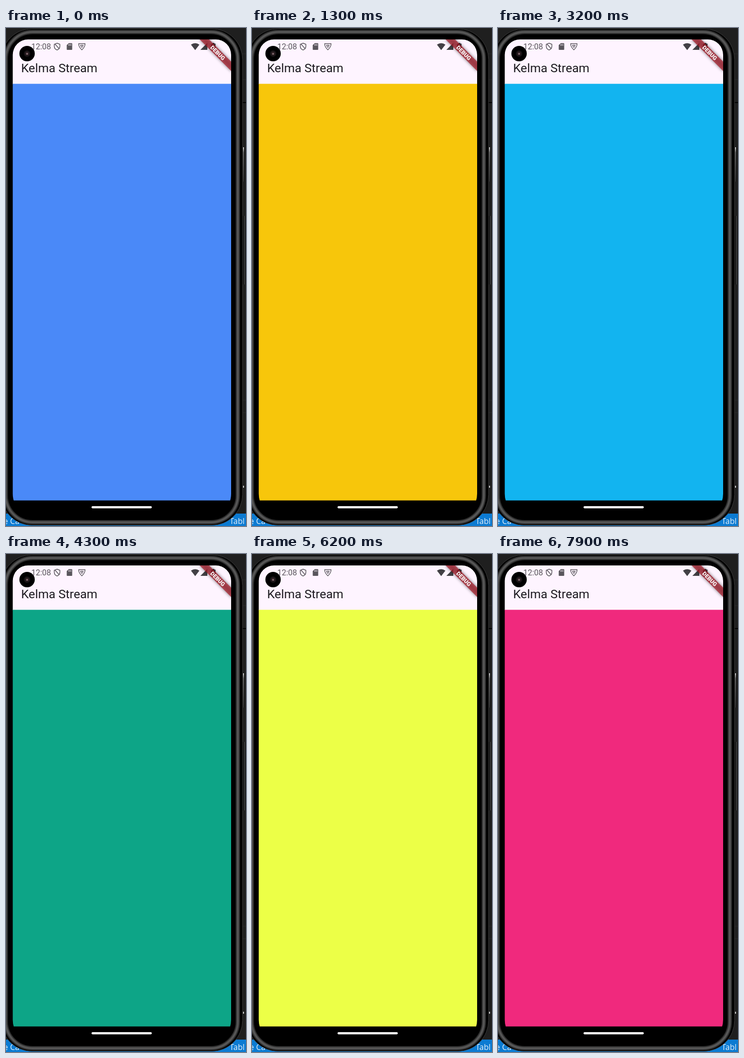
Animation of 484 by 1002 pixels, one loop 8000 ms. Source, as an HTML page:

```html
<!DOCTYPE html>
<html lang="en">
<head>
<meta charset="utf-8">
<title>Colour stream</title>
<style>
html, body { margin: 0; width: 100%; height: 100%; overflow: hidden; background: #1f1f1f; }
svg { display: block; }
text { font-family: Roboto, sans-serif; }
.desk { font: 16px "Open Sans", "Noto Sans", sans-serif; fill: #e4f0fa; }
</style>
</head>
<body>
<svg width="484" height="1002" viewBox="0 0 484 1002">
  <defs>
    <clipPath id="glass">
      <path d="M13.600 54A31 31 0 0 1 44.600 23H423A31 31 0 0 1 454 54V937A50 50 0 0 1 404 987H63.600A50 50 0 0 1 13.600 937Z"/>
    </clipPath>
    <linearGradient id="key" x2="0" y2="1">
      <stop offset="0" stop-color="#ddd"/>
      <stop offset=".15" stop-color="#666"/>
      <stop offset="1" stop-color="#333"/>
    </linearGradient>
    <filter id="blur" x="-20%" y="-80%" width="140%" height="260%"><feGaussianBlur stdDeviation="3.4"/></filter>
    <rect id="rim" x="-.5" y="8" width="468" height="986.500" rx="54" fill="none"/>
  </defs>

  <!-- desktop behind the phone -->
  <rect width="484" height="1002" fill="#1f1f1f"/>
  <path d="M474 52h10M474 104h10M474 749h10M474 774h10" stroke="#2b2b2b"/>
  <path d="M474 150h10" stroke="#000" stroke-width="2"/>
  <rect x="478" y="921" width="2" height="4" fill="#ccc"/>
  <rect y="977" width="484" height="25" fill="#0c7bd2"/>
  <text class="desk" x="-5" y="998">e Ca</text>
  <text class="desk" x="451" y="998">Tabl</text>

  <!-- phone body -->
  <rect x="477" y="240" width="4" height="69" fill="#111"/>
  <rect x="478" y="240" width="2" height="69" fill="url(#key)"/>
  <rect x="477" y="378" width="4" height="138" fill="#111"/>
  <path d="M480.500 378V516" stroke="#555"/>
  <rect x="-9.500" y="1.500" width="486.500" height="999" rx="62" fill="#000" stroke="#3a3a3a"/>
  <use href="#rim" stroke="#262626" stroke-width="9"/>
  <use href="#rim" stroke="#404040" stroke-width="6"/>
  <use href="#rim" stroke="#585858" stroke-width="3"/>

  <!-- screen -->
  <g clip-path="url(#glass)">
    <rect x="13" y="23" width="441" height="90" fill="#fef4ff"/>
    <rect id="body" x="13" y="112.300" width="441" height="838.300" fill="#4a89f8"/>
    <text x="30.500" y="88.500" font-size="24.600" fill="#1d1b20">Kelma Stream</text>
    <g fill="#59565c">
      <text x="51" y="43" font-size="16">12:08</text>
      <path d="M103 30.500l5.600 2.200v4.200q0 5-5.600 7.300q-5.600-2.300-5.600-7.300v-4.200zM98.500 32l9 10" fill="none" stroke="#59565c" stroke-width="1.500"/>
      <path d="M126.500 30.500H132.500Q133.500 30.500 133.500 31.500V43Q133.500 44 132.500 44H123.500Q122.500 44 122.500 43V34.500Z"/>
      <path d="M126.500 32.500v3M128.700 32.500v3M131 32.500v3" stroke="#fef4ff"/>
      <path d="M146.500 31.500H159.500Q159.500 38 153 44Q146.500 38 146.500 31.500Z" fill="none" stroke="#59565c" stroke-width="1.400" stroke-linejoin="round"/>
      <path d="M149.800 34h6.400q0 3-3.200 6q-3.200-3-3.200-6z"/>
      <circle cx="153" cy="36.300" r="1.200" fill="#fef4ff"/>
      <path d="M373 33.500Q381.500 27.500 390 33.500L381.500 44.500Z" fill="#424045"/>
      <path d="M406 30V44H392Z" fill="#424045"/>
      <path d="M416 30h4v1.500h2.500V44.500h-9V31.500H416z" fill="#353338"/>
    </g>
    <g transform="translate(454 23) rotate(45)">
      <rect x="-45" y="31.400" width="90" height="13.500" opacity=".5" filter="url(#blur)"/>
      <rect x="-45" y="31.400" width="90" height="13.500" fill="#a81c2a" fill-opacity=".7"/>
      <text y="42.200" font-size="11.400" font-weight="900" fill="#fff" text-anchor="middle">DEBUG</text>
    </g>
  </g>
  <circle cx="42.500" cy="51.500" r="15.500"/>
  <circle cx="42.500" cy="51.500" r="6.500" fill="#171315"/>
  <circle cx="42.500" cy="51.500" r="3.500" fill="#39272b"/>
  <circle cx="42.500" cy="52" r="1.200" fill="#b9a9ad"/>
  <rect x="172.500" y="962" width="121.500" height="4.500" rx="2.200" fill="#f4f4f4"/>
</svg>
<script>
// [start in ms, body colour]: one colour per tick of the stream
const ticks = [
  [0, "#4a89f8"], [200, "#607d8b"], [1300, "#f7c60b"], [2200, "#673ab7"], [3200, "#12b4f0"],
  [4300, "#0da587"], [5200, "#d420f4"], [6200, "#ecff47"], [7300, "#f0297d"]
];
const body = document.getElementById("body");

function draw() {
  const t = performance.now() % 8000;
  body.setAttribute("fill", ticks.findLast(([start]) => start <= t)[1]);
  requestAnimationFrame(draw);
}
draw();
</script>
</body>
</html>
```
